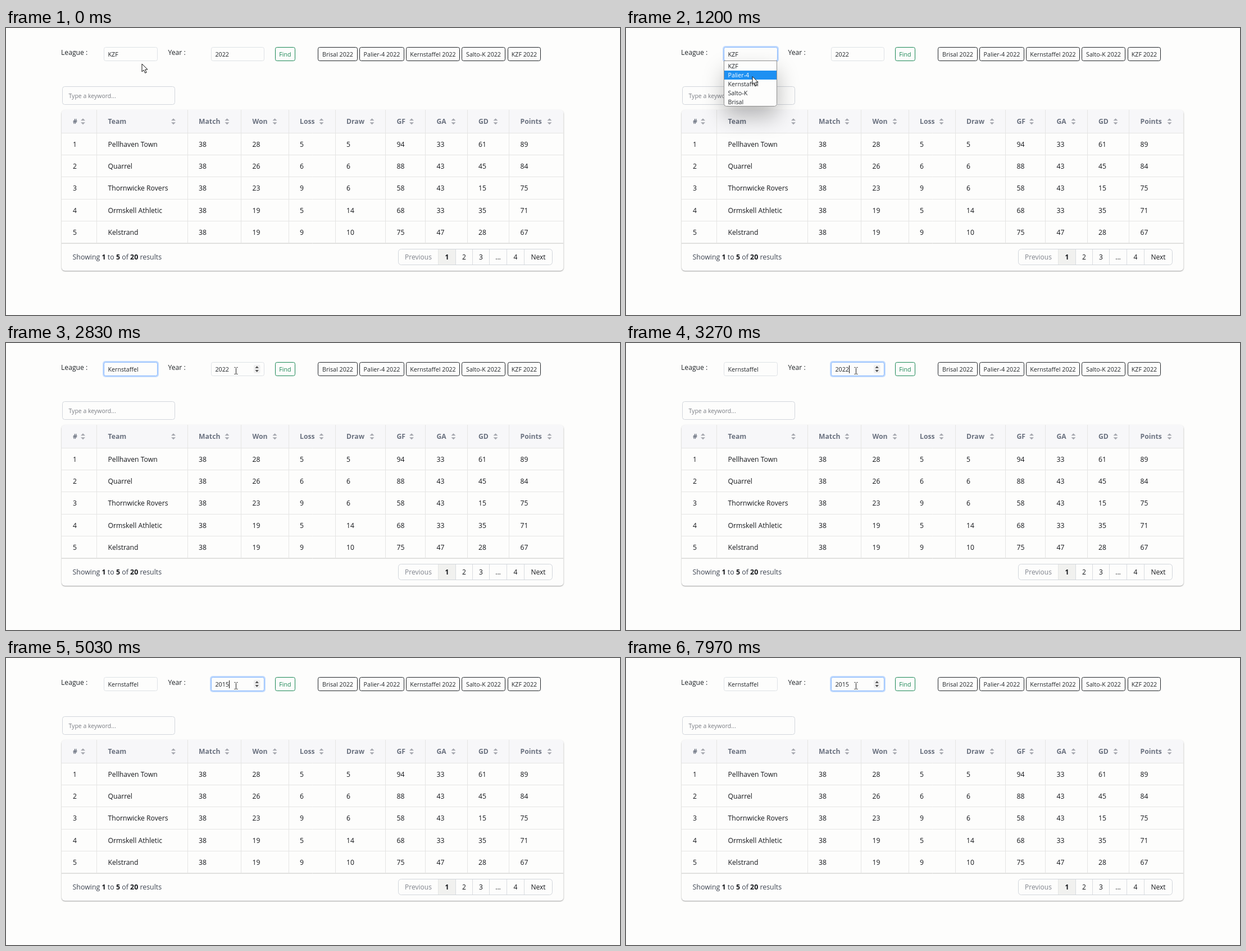
Write an HTML page with a canvas that moves like this. It is 1093x512 px and loops after 8000 ms.

```html
<!DOCTYPE html>
<html lang="en">
<head>
<meta charset="utf-8">
<title>League table</title>
<style>
  html, body { margin: 0; width: 100%; height: 100%; overflow: hidden; background: #fdfdfc; }
  canvas { display: block; }
</style>
</head>
<body>
<canvas id="stage" width="1093" height="512"></canvas>
<script>
const ctx = document.getElementById('stage').getContext('2d');
const LOOP = 8000;
const FONT = '"Open Sans", "Noto Sans", sans-serif';
const PAPER = '#fdfdfc', INK = '#212529', DARK = '#14161a', LINE = '#e5e5e4', MUTED = '#6b7280';
const BODY = 12.2, SMALL = 10.7;

const LEAGUES = ['KZF', 'Palier-4', 'Kernstaffel', 'Salto-K', 'Brisal'];

// label, left edge of column, centre of sort icon
const COLUMNS = [
  ['#', 99, 137], ['Team', 161.5, 298], ['Match', 323, 393.5], ['Won', 418.5, 478.5],
  ['Loss', 503, 561.5], ['Draw', 586, 651.5], ['GF', 675.5, 722], ['GA', 746.5, 796.5],
  ['GD', 821, 871.5], ['Points', 895.5, 967.5]
];
const ROWS = [
  '1|Pellhaven Town|38|28|5|5|94|33|61|89',
  '2|Quarrel|38|26|6|6|88|43|45|84',
  '3|Thornwicke Rovers|38|23|9|6|58|43|15|75',
  '4|Ormskell Athletic|38|19|5|14|68|33|35|71',
  '5|Kelstrand|38|19|9|10|75|47|28|67'
].map(row => row.split('|'));

// right edge of cell, label
const PAGES = [[769.5, 'Previous'], [800.5, '1'], [830.5, '2'], [860.5, '3'],
               [891.5, '...'], [922.5, '4'], [972.5, 'Next']];

// time, x, y of the pointer
const PATH = [[0, 242, 64], [30, 242, 64], [330, 230, 52], [850, 230, 52],
              [1330, 224, 94], [1430, 223, 99], [2100, 223, 99], [2770, 409, 49.5]];
const OPEN = 530, PICK = 2010, FOCUS_YEAR = 3100;
const KEYS = [[0, '2022'], [FOCUS_YEAR, '2022'], [3700, '202'], [3950, '20'], [4600, '201'], [4900, '2015']];

function text(str, x, y, { size = BODY, color = INK, weight = 400, align = 'left' } = {}) {
  ctx.font = `${weight} ${size}px ${FONT}`;
  ctx.fillStyle = color;
  ctx.textAlign = align;
  ctx.fillText(str, x, y);
  return ctx.measureText(str).width;
}

function box(x, y, w, h, r, stroke, fill) {
  ctx.beginPath();
  ctx.roundRect(x, y, w, h, r);
  if (fill) { ctx.fillStyle = fill; ctx.fill(); }
  if (stroke) { ctx.strokeStyle = stroke; ctx.lineWidth = 1; ctx.stroke(); }
}

function line(x1, y1, x2, y2, color = LINE) {
  ctx.beginPath();
  ctx.moveTo(x1, y1);
  ctx.lineTo(x2, y2);
  ctx.strokeStyle = color;
  ctx.lineWidth = 1;
  ctx.stroke();
}

function polygon(points, fill) {
  ctx.beginPath();
  points.forEach(([x, y]) => ctx.lineTo(x, y));
  ctx.closePath();
  ctx.fillStyle = fill;
  ctx.fill();
}

function arrowPair(x, y, half, height, gap, color) {
  for (const dir of [-1, 1]) {
    const base = y + dir * gap;
    polygon([[x - half, base], [x + half, base], [x, base + dir * height]], color);
  }
}

function withShadow(color, blur, dy, draw) {
  ctx.save();
  ctx.shadowColor = color;
  ctx.shadowBlur = blur;
  ctx.shadowOffsetY = dy;
  draw();
  ctx.restore();
}

function field(x, w, value, focused) {
  if (focused) box(x - 2.5, 32, w + 5, 29, 5, null, '#c2dbfe');
  box(x, 34.5, w, 24, 3, focused ? '#86b7fe' : '#dee2e6', PAPER);
  return text(value, x + 7, 51, { size: SMALL });
}

function button(x, w, label, color) {
  box(x, 34.5, w, 24, 3, color, PAPER);
  text(label, x + w / 2, 51, { size: SMALL, color, align: 'center' });
}

function drawTable() {
  withShadow('rgba(0,0,0,.38)', 2, 1, () => box(99, 146, 893.5, 287, 6, null, PAPER));
  box(99, 146, 893.5, 41.5, [6, 6, 0, 0], null, '#f7f7f9');
  COLUMNS.forEach(([label, x, icon], i) => {
    if (i) line(Math.floor(x) + .5, 146, Math.floor(x) + .5, 383.5);
    text(label, x + 20, 171, { weight: 700, color: MUTED });
    arrowPair(icon, 166.7, 4, 4, 1.5, '#a5a7ae');
  });
  line(99, 187.5, 992, 187.5);
  ROWS.forEach((row, r) => {
    const y = 207.5 + r * 39.3;
    row.forEach((cell, i) => text(cell, COLUMNS[i][1] + 20, Math.round(y + 4.2), { color: DARK }));
    const bottom = Math.floor(226.5 + r * 39.3) + .5;
    line(99, bottom, 992, bottom);
  });
  line(99, 384.5, 992, 384.5, '#dcdcda');
  line(98.5, 152, 98.5, 427, '#e2e2e0');
  line(992.5, 152, 992.5, 427, '#e2e2e0');

  let x = 118.5;
  'Showing |1| to |5| of |20| results'.split('|').forEach((part, i) => {
    const style = i % 2 ? { weight: 700, color: DARK } : { color: '#3d4451' };
    x += text(part, x, 413, { size: 12.4, ...style });
  });

  box(698.5, 394.5, 274, 28, 5, '#d2d6dc', PAPER);
  let left = 698.5;
  PAGES.forEach(([right, label], i) => {
    const current = label === '1';
    if (current) box(left, 395, right - left, 27, 0, null, '#f1f1ef');
    if (i < PAGES.length - 1) line(right, 395, right, 422, '#d9dce0');
    text(label, (left + right) / 2, 413, {
      size: 12, align: 'center', weight: current ? 700 : 400, color: i ? DARK : '#7f838c'
    });
    left = right;
  });
}

function drawControls(t) {
  const hover = t >= 2650;
  const yearFocus = t >= FOCUS_YEAR;
  text('League :', 98, 48);
  text('Year :', 288.5, 48);
  field(174.5, 95, t < PICK ? LEAGUES[0] : LEAGUES[2], t >= OPEN && !yearFocus);

  const [typedAt, year] = KEYS.findLast(([at]) => t >= at);
  const width = field(365.5, 94, year, yearFocus);
  if (hover) {
    box(441, 39, 11.5, 15, 2, null, '#efefef');
    arrowPair(446.7, 46.5, 3.2, 3.5, 1.7, '#444');
  }
  if (yearFocus && Math.floor((t - typedAt) / 530) % 2 === 0) {
    ctx.fillStyle = '#111';
    ctx.fillRect(Math.round(372.5 + width), 40, 1, 14);
  }

  button(479.5, 35, 'Find', '#198754');
  [[555.5, 70, 4], [629.5, 79, 1], [712.5, 95, 2], [811.5, 77, 3], [893.5, 58, 0]]
    .forEach(([x, w, i]) => button(x, w, LEAGUES[i] + ' 2022', INK));

  box(100.5, 104.5, 200, 32, 4, '#d2d6dc', PAPER);
  text('Type a keyword...', 111.5, 125, { size: 10.5, color: '#7b7e85' });
}

function drawMenu(pointerY) {
  const corners = [0, 0, 4, 4];
  withShadow('rgba(0,0,0,.28)', 38, 18, () => box(175, 59, 94, 81, corners, null, PAPER));
  box(174.5, 58.5, 94, 81, corners, '#8f8f8f', PAPER);
  const active = Math.max(0, Math.floor((pointerY - 60) / 16));
  LEAGUES.forEach((name, i) => {
    const top = 60 + i * 16;
    if (i === active) box(175, top, 93, 16, 0, null, '#1e90f2');
    text(name, 181.5, top + 12, { size: SMALL, color: i === active ? '#fff' : INK });
  });
}

function pointerAt(t) {
  const next = PATH.findIndex(([at]) => at > t);
  if (next < 0) return PATH.at(-1).slice(1);
  const [t0, x0, y0] = PATH[next - 1], [t1, x1, y1] = PATH[next];
  const u = (t - t0) / (t1 - t0), k = u * u * (3 - 2 * u);
  return [x0 + (x1 - x0) * k, y0 + (y1 - y0) * k];
}

function drawPointer(x, y) {
  if (x > 365 && y < 59) {
    const cx = Math.round(x) + .5;
    line(cx, y - 5, cx, y + 6, '#222');
    for (const end of [y - 6, y + 6]) {
      line(cx - 3, end, cx - 1, end, '#222');
      line(cx + 1, end, cx + 3, end, '#222');
    }
    return;
  }
  const shape = [[0, 0], [0, 14], [3.2, 11], [5.6, 16.3], [8, 15.3], [5.7, 10.2], [10, 10]];
  polygon(shape.map(([dx, dy]) => [x + dx, y + dy]), '#fff');
  ctx.strokeStyle = '#111';
  ctx.lineWidth = 1;
  ctx.stroke();
}

function render(t) {
  ctx.fillStyle = PAPER;
  ctx.fillRect(0, 0, 1093, 512);
  const [x, y] = pointerAt(t);
  drawTable();
  drawControls(t);
  if (t >= OPEN && t < PICK) drawMenu(y);
  drawPointer(x, y);
}

const start = performance.now();
function tick() {
  render((performance.now() - start) % LOOP);
  requestAnimationFrame(tick);
}
tick();
</script>
</body>
</html>
```
